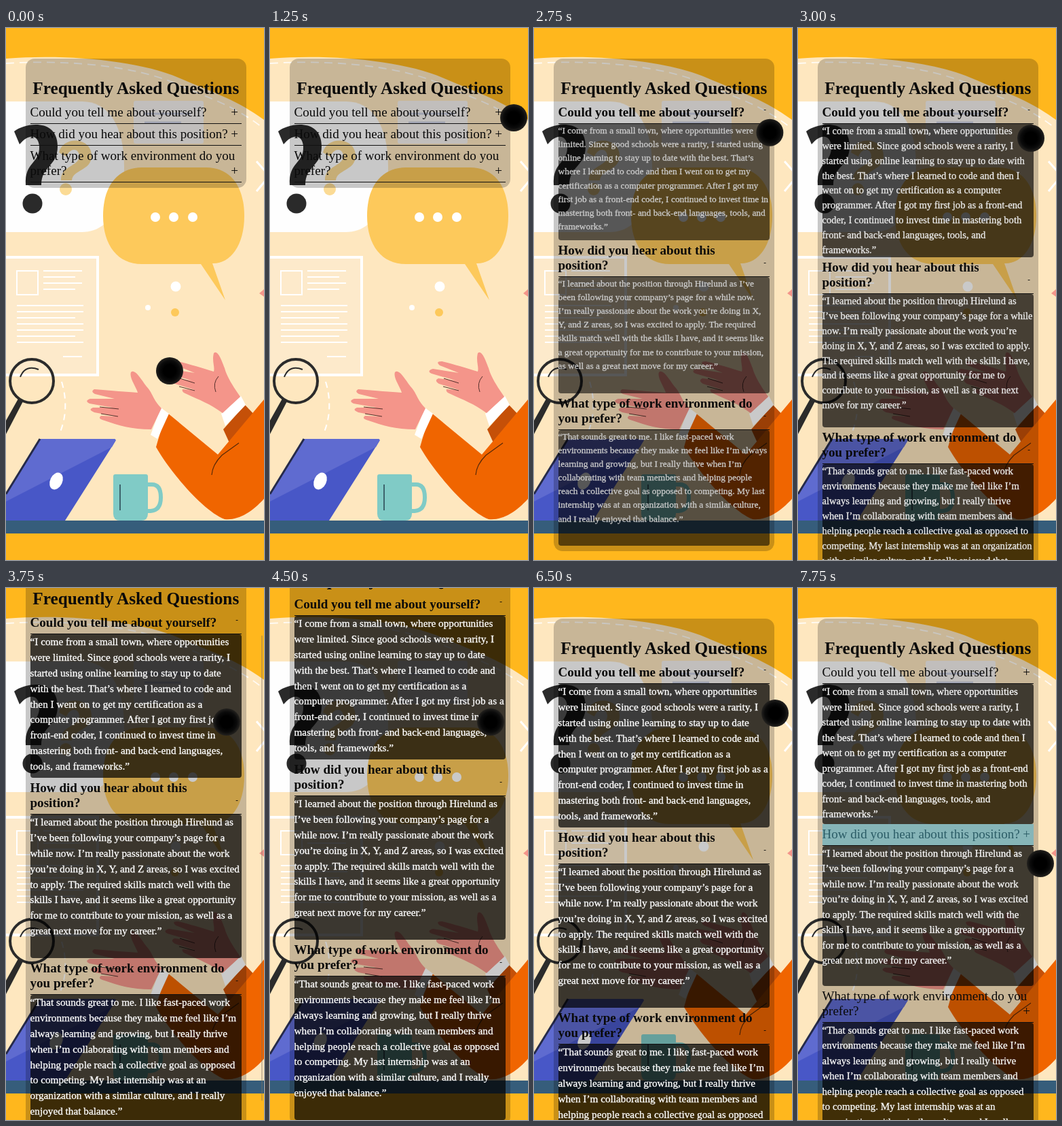
An HTML page that plays this animation: 380x782 px, repeating every 8000 ms.

```html
<!DOCTYPE html>
<html lang="en">
<head>
<meta charset="utf-8">
<title>Frequently Asked Questions</title>
<style>
html, body { margin: 0; width: 100%; height: 100%; overflow: hidden; }
body { background: #ffb71d; font-family: "Liberation Serif", "Times New Roman", serif; color: #0a0a0a; }
#stage { position: relative; width: 380px; height: 782px; overflow: hidden; }
#art { position: absolute; left: 0; top: 0; }
#panel {
  position: absolute; left: 28.5px; top: 45px; width: 325.5px; padding: 0 7px 8px;
  box-sizing: border-box; border-radius: 13px; background: rgba(0, 0, 0, .21);
}
h1 {
  margin: 0; padding-top: 28px; height: 36px; line-height: 30px;
  font-size: 25.26px; text-align: center; white-space: nowrap;
}
.q {
  position: relative; padding: 4px 8px 5px 0; border-bottom: 1px solid #111;
  font-size: 19.07px; line-height: 22px;
}
.q::after { content: "+"; position: absolute; right: 5px; bottom: 5px; }
.open .q::after { content: "-"; }
.bold .q { font-weight: 700; }
.bold .q::after { font-size: 11px; line-height: 12px; bottom: 15px; }
.q.hot { background: #86b5b8; color: #2b5c66; }
.a {
  height: calc(211px * var(--p)); overflow: hidden; border-radius: 4px;
  font-size: calc(5.72px + 9.53px * var(--p)); line-height: 1.5;
  background: rgba(0, 0, 0, calc(.7 * var(--p)));
  color: rgb(calc(255 * var(--p)), calc(255 * var(--p)), calc(255 * var(--p)));
  -webkit-text-stroke: .02em currentColor;
}
#thumb {
  position: absolute; left: 376px; top: 6px; width: 2px; height: 684px;
  border-radius: 1px; background: rgba(120, 110, 95, .4);
}
#touch {
  position: absolute; left: -20px; top: -20px; width: 40px; height: 40px; border-radius: 50%;
  background: radial-gradient(circle closest-side, #000 45%, #0b0b0b 75%, #24221f 100%);
}
</style>
</head>
<body>
<div id="stage">
  <svg id="art" width="380" height="782" viewBox="0 0 380 782" fill="none">
    <rect width="380" height="782" fill="#ffb71d"/>
    <path d="M0 45C90 38 195 48 254 73S340 106 380 135V724H0Z" fill="#fee7bf"/>
    <path d="M0 52C90 46 190 56 248 81S336 114 380 148" stroke="#fff" stroke-width="1.8" stroke-dasharray="12 8" opacity=".85"/>

    <!-- notes and bubbles -->
    <rect x="188" y="107" width="103" height="63" rx="3" fill="#f4f1ee"/>
    <path d="M204 126H272M204 139H258" stroke="#c9cde0" stroke-width="3"/>
    <path d="M0 108H112C150 108 174 142 174 204S148 300 112 300H0Z" fill="#fefefe"/>
    <path d="M78 183C84 158 126 160 126 188C126 210 98 208 97 224H81C80 202 108 204 108 188C107 176 94 176 89 189Z" fill="#fbdb95"/>
    <circle cx="88" cy="237" r="9" fill="#fbdb95"/>
    <path d="M12 152C28 139 76 132 76 174C76 204 52 202 52 231H29C27 196 50 200 49 174C48 157 34 154 20 171Z" fill="#2a2a2a"/>
    <circle cx="39" cy="258" r="14.5" fill="#2a2a2a"/>
    <path d="M200 205H295C330 205 351 232 351 276S330 347 304 346L323 400L287 347H200C165 347 143 320 143 276S165 205 200 205Z" fill="#fdc95b"/>
    <g fill="#fff">
      <circle cx="220" cy="278" r="7"/><circle cx="247" cy="278" r="7"/><circle cx="275" cy="278" r="7"/>
      <circle cx="250" cy="380" r="7.5"/><circle cx="209" cy="411" r="4"/>
    </g>
    <circle cx="249" cy="418" r="6" fill="#fdc95b"/>

    <!-- document -->
    <g stroke="#fff" stroke-width="2">
      <path d="M-5 337H135V510H-5" stroke-width="4" fill="#fdeacb"/>
      <path d="M16 357H47V392H16ZM55 357H112M55 366H102M55 375H112M55 384H102M84 483H112"/>
      <path d="M16 408H114M16 417H114M16 426H102M16 435H114M16 444H114M16 453H102M16 462H114"/>
      <path d="M82 520Q94 560 79 596" stroke-dasharray="9 7"/>
      <path d="M369 196L384 213M369 240L384 222" stroke-width="3"/>
    </g>

    <!-- magnifier -->
    <path d="M18 545L25 549L0 597V577Z" fill="#2b2b2b"/>
    <circle cx="38" cy="519" r="32" stroke="#2b2b2b" stroke-width="4"/>
    <path d="M21 513C26 500 36 497 48 502" stroke="#2b2b2b" stroke-width="2"/>

    <!-- laptop and mug -->
    <path d="M50 604H158Q164 604 160 609L87 724H0V684Z" fill="#4857c7"/>
    <path d="M50 604H158Q164 604 160 609L156 616L0 696V684Z" fill="#5f6bd0"/>
    <path d="M50 604L0 685" stroke="#252a4a" stroke-width="3"/>
    <ellipse cx="74" cy="666" rx="9" ry="13" transform="rotate(25 74 666)" fill="#fff"/>
    <path d="M206 671H215Q228 671 228 690T213 710H206" stroke="#80cbc6" stroke-width="6"/>
    <path d="M161 656H206Q209 656 209 659V714Q209 724 199 724H168Q158 724 158 714V659Q158 656 161 656Z" fill="#80cbc6"/>
    <path d="M168 671V709" stroke="#2d4a55" stroke-width="1.6"/>

    <!-- arms -->
    <path d="M380 384L373 390L380 395Z" fill="#f4958a"/>
    <path d="M352 554L320 590L331 614L345 610L372 575Z" fill="#c55008"/>
    <path d="M238 566L312 627L380 546V692C362 712 342 724 322 722C290 710 240 650 221 616Q228 590 238 566Z" fill="#f06500"/>
    <path d="M303 657Q304 642 318 628L343 610" stroke="#5a2a08" stroke-width="1.2"/>
    <path d="M228 558L240 567L223 604L213 598ZM317 567L346 541L353 554L323 585Z" fill="#fff"/>
    <g fill="#f4958a">
      <path d="M229 559C216 546 216 536 207 527C200 518 190 500 184 506C181 514 192 528 194 536C178 535 156 533 130 531Q124 534 131 538L160 545L124 545Q115 548 123 552L157 558L128 558Q120 561 130 565L162 571L140 570Q134 574 145 577C165 584 185 590 214 590Z"/>
      <path d="M345 542C334 526 325 512 322 500C318 490 312 472 306 478C303 490 308 498 306 505C290 500 270 494 253 490Q243 490 250 496L278 507L240 501Q230 504 238 508L273 518L248 515Q241 518 249 523L278 532L260 531Q258 535 266 538C285 547 300 552 319 566Z"/>
    </g>
    <path d="M138 557L166 560M140 567L165 571M256 515L278 522M255 527L278 533M313 512Q304 522 309 535" stroke="#55302c" stroke-width="1"/>

    <rect y="724" width="380" height="19" fill="#365d7b"/>
  </svg>
  <div id="panel"><h1>Frequently Asked Questions</h1></div>
  <div id="thumb"></div>
  <div id="touch"></div>
</div>
<script>
const LOOP = 8000, STEP = 250, OPEN = 2002, CLOSE = 7690, FADE = 1475;
const $ = id => document.getElementById(id);
const panel = $('panel'), thumb = $('thumb'), touch = $('touch');

const faq = [
  ['Could you tell me about yourself?',
   '“I come from a small town, where opportunities were limited. Since good schools were a rarity, I started using online learning to stay up to date with the best. That’s where I learned to code and then I went on to get my certification as a computer programmer. After I got my first job as a front-end coder, I continued to invest time in mastering both front- and back-end languages, tools, and frameworks.”'],
  ['How did you hear about this position?',
   '“I learned about the position through Hirelund as I’ve been following your company’s page for a while now. I’m really passionate about the work you’re doing in X, Y, and Z areas, so I was excited to apply. The required skills match well with the skills I have, and it seems like a great opportunity for me to contribute to your mission, as well as a great next move for my career.”'],
  ['What type of work environment do you prefer?',
   '“That sounds great to me. I like fast-paced work environments because they make me feel like I’m always learning and growing, but I really thrive when I’m collaborating with team members and helping people reach a collective goal as opposed to competing. My last internship was at an organization with a similar culture, and I really enjoyed that balance.”']
];

function add(cls, text) {
  const el = document.createElement('div');
  el.className = cls;
  el.textContent = text;
  panel.append(el);
  return el;
}
const questions = faq.map(([q, a]) => {
  const el = add('q', q);
  add('a', a);
  return el;
});

// [ms, x, y]
const touchPath = [
  [0, 241, 504], [250, 228, 508], [500, 262, 425], [750, 312, 290], [1000, 345, 180],
  [1250, 359, 132], [1500, 358, 156], [1750, 358, 156], [2250, 356, 137], [3000, 343, 162],
  [3500, 325, 197], [5750, 325, 197], [6500, 355, 184], [7000, 353, 230], [7500, 350, 375], [7750, 357, 405]
];
// [ms, offset]
const scrollPath = [
  [0, 0], [3000, 0], [3250, 12], [3500, 40], [3750, 73], [4000, 94], [4250, 100],
  [5000, 100], [5250, 24], [5500, 0]
];

function along(path, t) {
  const i = path.findIndex(k => k[0] > t);
  if (i < 0) return path[path.length - 1].slice(1);
  const a = path[i - 1], b = path[i], f = (t - a[0]) / (b[0] - a[0]);
  return a.slice(1).map((v, n) => v + (b[n + 1] - v) * f);
}

// cubic-bezier(.25, .1, .25, 1)
function ease(x) {
  if (x <= 0) return 0;
  if (x >= 1) return 1;
  const curve = (s, p, q) => 3 * (1 - s) ** 2 * s * p + 3 * (1 - s) * s * s * q + s ** 3;
  let lo = 0, hi = 1;
  for (let i = 0; i < 24; i++) {
    const mid = (lo + hi) / 2;
    if (curve(mid, .25, .25) < x) lo = mid; else hi = mid;
  }
  return curve(lo, .1, 1);
}

function draw(t) {
  const closing = t >= CLOSE;
  const p = closing ? 1 - ease((t - CLOSE) / FADE) : ease((t - OPEN) / FADE);
  panel.style.setProperty('--p', p.toFixed(4));
  panel.classList.toggle('open', t >= 2000 && !closing);
  panel.classList.toggle('bold', t >= 2500 && !closing);
  questions[1].classList.toggle('hot', closing);

  const [y] = along(scrollPath, t);
  panel.style.transform = `translateY(${-y}px)`;
  thumb.style.transform = `translateY(${y / 882 * 770}px)`;
  const scrolling = (t >= 3250 && t < 4500) || (t >= 5250 && t < 6250);
  thumb.style.opacity = scrolling ? 1 : 0;

  const [cx, cy] = along(touchPath, t);
  touch.style.transform = `translate(${cx}px, ${cy}px)`;
}

// The picture advances four times a second.
function tick() {
  draw(Math.floor(performance.now() % LOOP / STEP) * STEP);
  requestAnimationFrame(tick);
}
tick();
</script>
</body>
</html>
```
